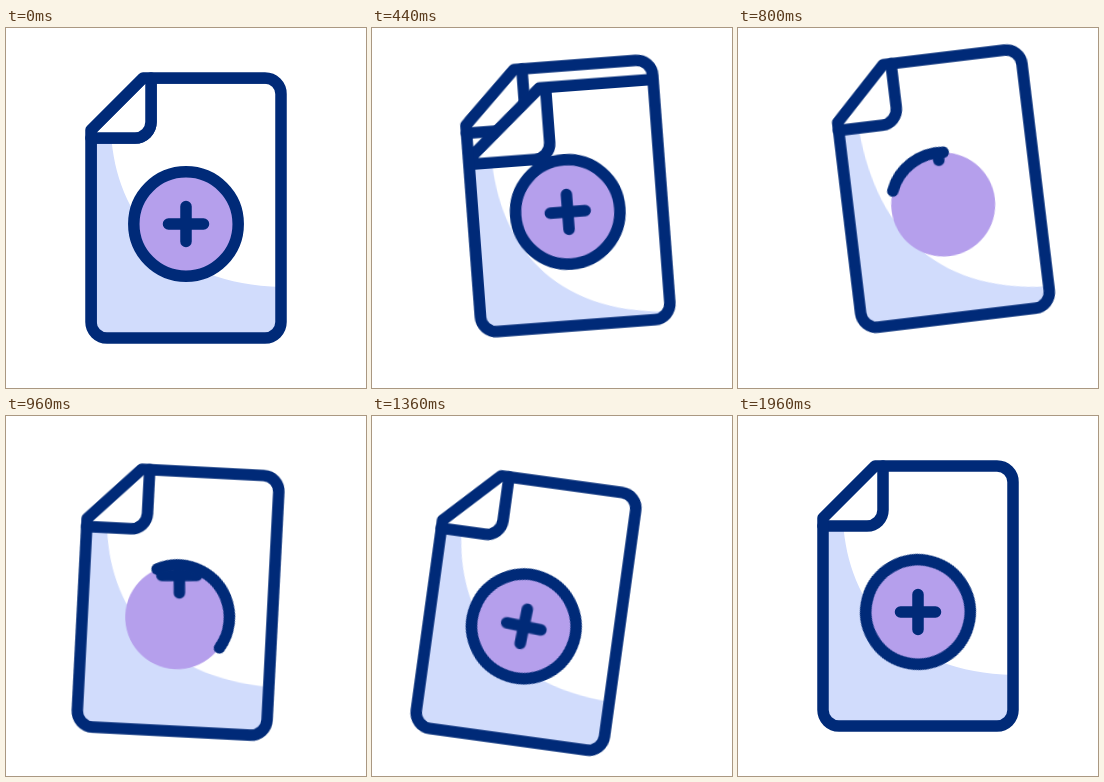
An HTML page for the animation above (2 s loop, 360 px wide and 360 px high).

```html
<!DOCTYPE html>
<html lang="en">
<head>
<meta charset="utf-8">
<title>Add document</title>
<style>
  html, body { margin: 0; width: 100%; height: 100%; overflow: hidden; background: #fff; }
  svg { display: block; width: 100vw; height: 100vh; }

  .ink { fill: none; stroke: #002a78; stroke-width: 11.5; stroke-linecap: round; stroke-linejoin: round; }
  .paper { fill: #fff; }
  .disc { fill: #b59fec; }
  .wave { fill: #d1dcfc; }

  .doc, .wave, .sheet, .cut, .ring, .plus { animation: 2s linear infinite; }
  .doc { animation-name: tilt; transform-origin: 180px 180px; }
  .wave { animation-name: wave; }
  .sheet { animation-name: peel; }
  .cut { animation-name: cut; }
  .ring { animation-name: ring; transform-origin: 180px 196px; }
  .plus { animation-name: drop; transform-origin: 180px 196px; }

  @keyframes tilt {
    0%, 11% { transform: translate(0, 0) rotate(0deg); animation-timing-function: cubic-bezier(.4, 0, .25, 1); }
    38.25% { transform: translate(25px, -20.7px) rotate(-7.4deg); animation-timing-function: cubic-bezier(.4, 0, .7, .73); }
    48% { transform: translate(-7.8px, 5.2px) rotate(2.9deg); animation-timing-function: cubic-bezier(.15, .43, .3, 1); }
    66.5% { transform: translate(-26.5px, 14.8px) rotate(8deg); animation-timing-function: cubic-bezier(.25, 0, .15, 1); }
    95%, 100% { transform: translate(0, 0) rotate(0deg); }
  }

  /* The right end slides down the side, along the bottom and back */
  @keyframes wave {
    0%, 12% { d: path("M105 105C110 190 165 256 275 259V310H85V105Z"); animation-timing-function: ease-in; }
    22% { d: path("M108 136C110 222 155 297 275 303V310H85V136Z"); }
    32% { d: path("M103 105C112 150 138 215 158 312V310H85V105Z"); animation-timing-function: ease-in; }
    38% { d: path("M105 105C108 215 155 295 275 303V310H85V105Z"); animation-timing-function: ease-out; }
    48% { d: path("M105 105C110 190 165 256 275 261V310H85V105Z"); }
    62%, 100% { d: path("M105 105C110 190 165 256 275 259V310H85V105Z"); }
  }

  /* Turning sheet: folded flap plus its top and left edges */
  @keyframes peel {
    0%, 11.5% { d: path("M85 102L137 50H145V94a16 16 0 0 1 -16 16H85ZM137 50H275M85 102V310"); animation-timing-function: cubic-bezier(.5, 0, .8, .6); }
    22% { d: path("M85 136L161 70H167V125a16 16 0 0 1 -16 16H85ZM161 70H275M85 136V310"); animation-timing-function: cubic-bezier(.4, .25, .8, .7); }
    27% { d: path("M100 191L197 104H201V178a16 16 0 0 1 -16 16H100ZM197 104H275M100 191V310"); }
    32% { d: path("M133 273L251 162H252V256a16 16 0 0 1 -16 16H133ZM251 162H275M133 273V310"); }
    35% { d: path("M190 304L270 235H270V288a16 16 0 0 1 -16 16H190ZM270 235H275M190 304V310"); }
    38%, 100% { d: path("M275 310L275 310H275V309a1 1 0 0 1 -1 1H275ZM275 310H275M275 310V310"); }
  }

  /* Part of the sheet that still lies flat */
  @keyframes cut {
    0%, 11.5% { d: path("M85 102L137 50H300V330H85Z"); animation-timing-function: cubic-bezier(.5, 0, .8, .6); }
    22% { d: path("M85 136L161 70H300V330H85Z"); animation-timing-function: cubic-bezier(.4, .25, .8, .7); }
    27% { d: path("M100 191L197 104H300V330H100Z"); }
    32% { d: path("M133 273L251 162H300V330H133Z"); }
    35% { d: path("M190 304L270 235H300V330H190Z"); }
    38%, 100% { d: path("M275 310L275 310H300V330H275Z"); }
  }

  @keyframes ring {
    0% { opacity: 0; stroke-dasharray: 1 400; transform: rotate(-201deg); }
    31.4% { opacity: 0; stroke-dasharray: 1 400; transform: rotate(-201deg); }
    31.5% { opacity: 1; }
    32% { opacity: 1; stroke-dasharray: 1 400; transform: rotate(-201deg); }
    48% { opacity: 1; stroke-dasharray: 148 400; transform: rotate(-116deg); animation-timing-function: cubic-bezier(.3, .3, .5, 1); }
    64%, 100% { opacity: 1; stroke-dasharray: 361 400; transform: rotate(-30deg); }
  }

  @keyframes drop {
    0%, 32% { transform: translateY(-82px) rotate(-3deg); }
    48% { transform: translateY(-42px) rotate(-3deg); animation-timing-function: cubic-bezier(.3, .3, .5, 1); }
    62% { transform: translateY(0) rotate(3deg); }
    68% { transform: translateY(0) rotate(4deg); animation-timing-function: ease-out; }
    82%, 100% { transform: translateY(0) rotate(0deg); }
  }
</style>
</head>
<body>
<svg viewBox="0 0 360 360">
  <defs>
    <path id="page" d="M85 102L137 50H259a16 16 0 0 1 16 16V294a16 16 0 0 1 -16 16H101a16 16 0 0 1 -16 -16Z"/>
    <path id="cross" d="M162.5 196H197.5M180 178.5V213.5"/>
    <clipPath id="inPage"><use href="#page"/></clipPath>
    <clipPath id="inDisc"><circle cx="180" cy="196" r="52"/></clipPath>
    <clipPath id="flat"><path class="cut" d="M85 102L137 50H300V330H85Z"/></clipPath>
  </defs>

  <g class="doc">
    <use href="#page" class="paper"/>
    <g clip-path="url(#inPage)">
      <path class="wave" d="M105 105C110 190 165 256 275 259V310H85V105Z"/>
    </g>
    <circle class="disc" cx="180" cy="196" r="52"/>

    <!-- page underneath -->
    <g clip-path="url(#inDisc)">
      <g class="plus"><use href="#cross" class="ink"/></g>
    </g>
    <circle class="ink ring" cx="180" cy="196" r="52.2" pathLength="360"/>
    <path class="ink" style="fill:#fff" d="M145 50V94a16 16 0 0 1 -16 16H85"/>

    <!-- page being turned -->
    <g class="ink" clip-path="url(#flat)">
      <circle cx="180" cy="196" r="52.2"/>
      <use href="#cross"/>
    </g>
    <g clip-path="url(#inPage)">
      <path class="ink sheet" style="fill:#fff" d="M85 102L137 50H145V94a16 16 0 0 1 -16 16H85ZM137 50H275M85 102V310"/>
    </g>

    <use href="#page" class="ink"/>
  </g>
</svg>
</body>
</html>
```
